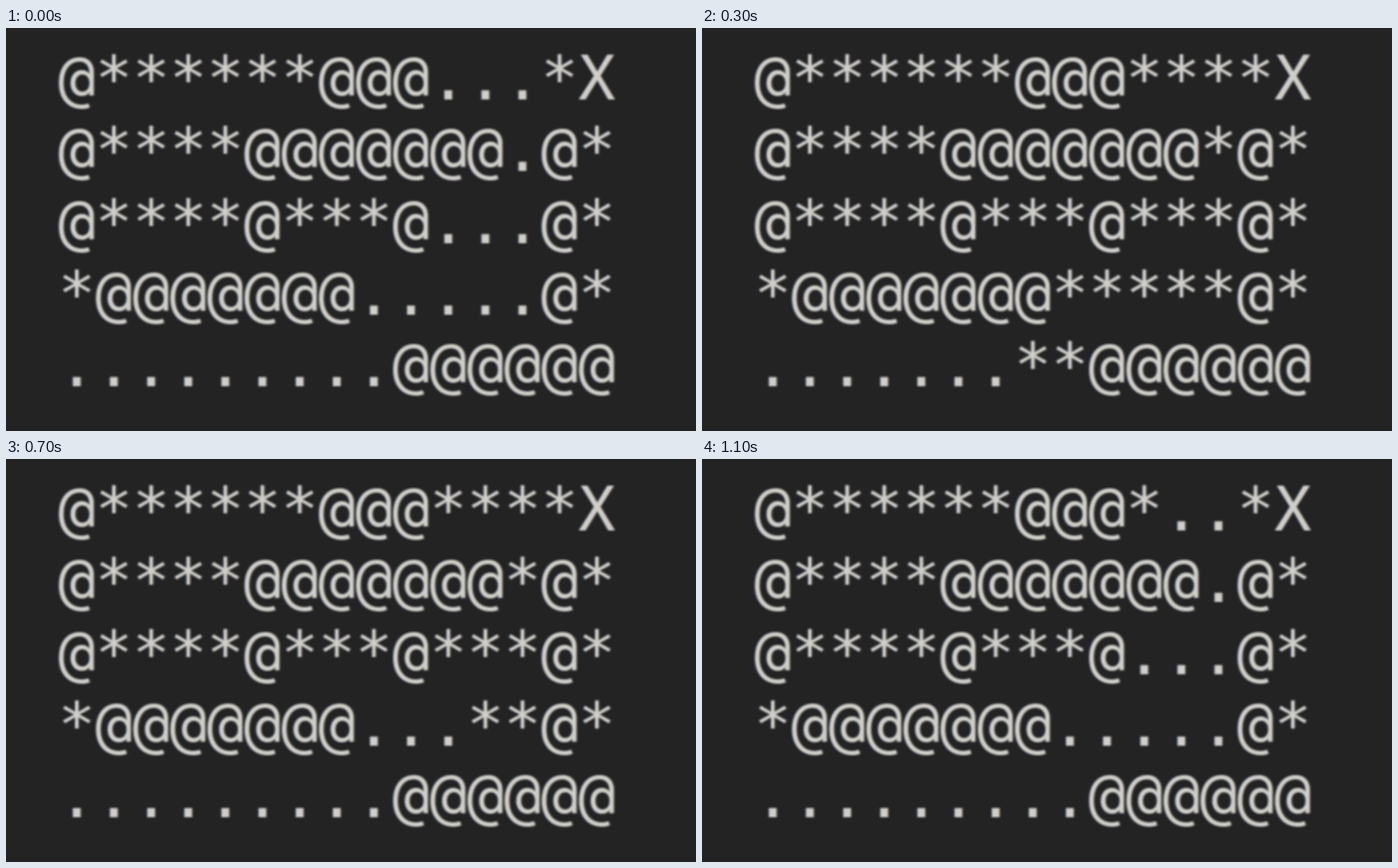
These frames come from a looping animation (800x468 px, 1200 ms). An HTML page:

```html
<!DOCTYPE html>
<html lang="en">
<head>
<meta charset="utf-8">
<title>Maze search</title>
<style>
  html, body { margin: 0; width: 100%; height: 100%; overflow: hidden; background: #232324; }
  pre {
    position: absolute; left: 60.5px; top: 17px; margin: 0;
    font: 71.54px/83.3px "DejaVu Sans Mono", monospace;
    color: #d0cec8;
    text-shadow: -1.5px 0 1px rgba(60, 95, 140, .3), 1.5px 0 1px rgba(150, 130, 95, .3);
    filter: blur(.9px);
  }
</style>
</head>
<body>
<pre id="maze"></pre>
<script>
const grid = [
  "@******@@@****X",
  "@****@@@@@@@*@*",
  "@****@***@***@*",
  "*@@@@@@@*****@*",
  "*********@@@@@@"
].map(row => [...row]);
const dirs = [[-1, 0], [0, -1], [1, 0], [0, 1]];
const seen = new Set();
const states = [""];

// Depth-first walk: one state per newly entered cell, dots are erased on backtracking.
function walk(r, c) {
  const cell = grid[r]?.[c], key = r + "," + c;
  if (cell === "X") return true;
  if (cell !== "*" || seen.has(key)) return false;
  seen.add(key);
  grid[r][c] = ".";
  states.push(grid.map(row => row.join("")).join("\n"));
  if (dirs.some(([dr, dc]) => walk(r + dr, c + dc))) return true;
  grid[r][c] = "*";
  return false;
}
walk(4, 0);

// Number of cells entered at each 100 ms tick; the loop opens on the solved maze.
const steps = [25, 4, 6, 8, 10, 12, 14, 16, 18, 19, 22, 24];
const maze = document.getElementById("maze");

function draw() {
  const tick = Math.floor(performance.now() % 1200 / 100);
  const text = states[steps[tick]];
  if (maze.textContent !== text) maze.textContent = text;
  requestAnimationFrame(draw);
}
draw();
</script>
</body>
</html>
```
